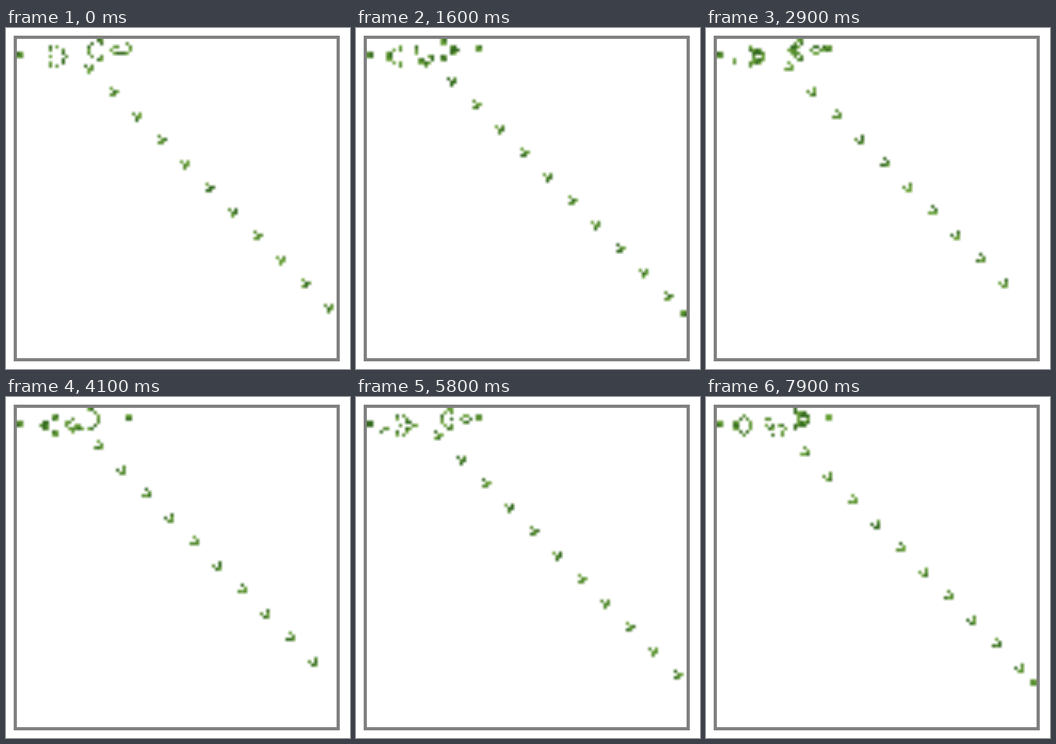
These frames come from a looping animation (538x534 px, 8000 ms). An HTML page with a canvas:

```html
<!DOCTYPE html>
<html lang="en">
<head>
<meta charset="utf-8">
<title>Glider gun</title>
<style>
  html, body { margin: 0; width: 100%; height: 100%; overflow: hidden; background: #fff; }
  canvas { position: absolute; left: 12px; top: 12px; width: 500px; height: 500px; border: 5px solid #808080; }
</style>
</head>
<body>
<canvas width="100" height="100"></canvas>
<script>
const SIZE = 100, STEP = 100, LOOP = 8000, WARMUP = 324;
const GREENS = ['#33691e', '#558b2f', '#689f38'];
const GUN = [
  '........................O',
  '......................O.O',
  '............OO......OO............OO',
  '...........O...O....OO............OO',
  'OO........O.....O...OO',
  'OO........O...O.OO....O.O',
  '..........O.....O.......O',
  '...........O...O',
  '............OO'
];

const ctx = document.querySelector('canvas').getContext('2d');

// Cells beyond the edges are always dead.
function evolve(live) {
  const counts = new Uint8Array(SIZE * SIZE);
  for (const cell of live) {
    const x = cell % SIZE, y = (cell - x) / SIZE;
    for (let dy = -1; dy <= 1; dy++) {
      for (let dx = -1; dx <= 1; dx++) {
        const nx = x + dx, ny = y + dy;
        if ((dx || dy) && nx >= 0 && ny >= 0 && nx < SIZE && ny < SIZE) counts[ny * SIZE + nx]++;
      }
    }
  }
  const next = new Set();
  counts.forEach((n, cell) => {
    if (n === 3 || (n === 2 && live.has(cell))) next.add(cell);
  });
  return next;
}

function shade(cell, step) {
  const v = Math.sin(cell * 12.9898 + step * 78.233) * 43758.5453;
  return GREENS[Math.floor((v - Math.floor(v)) * GREENS.length)];
}

let live = new Set();
GUN.forEach((row, y) => [...row].forEach((c, x) => {
  if (c === 'O') live.add(y * SIZE + x);
}));
for (let i = 0; i < WARMUP; i++) live = evolve(live);

const generations = [live];
while (generations.length < LOOP / STEP) generations.push(evolve(generations.at(-1)));

let shown = -1;
function draw(step) {
  if (step === shown) return;
  shown = step;
  ctx.fillStyle = '#fff';
  ctx.fillRect(0, 0, SIZE, SIZE);
  for (const cell of generations[step]) {
    ctx.fillStyle = shade(cell, step);
    ctx.fillRect(cell % SIZE, Math.floor(cell / SIZE), 1, 1);
  }
}

const start = performance.now();
function tick() {
  draw(Math.floor(((performance.now() - start) % LOOP) / STEP));
  requestAnimationFrame(tick);
}
tick();
</script>
</body>
</html>
```
